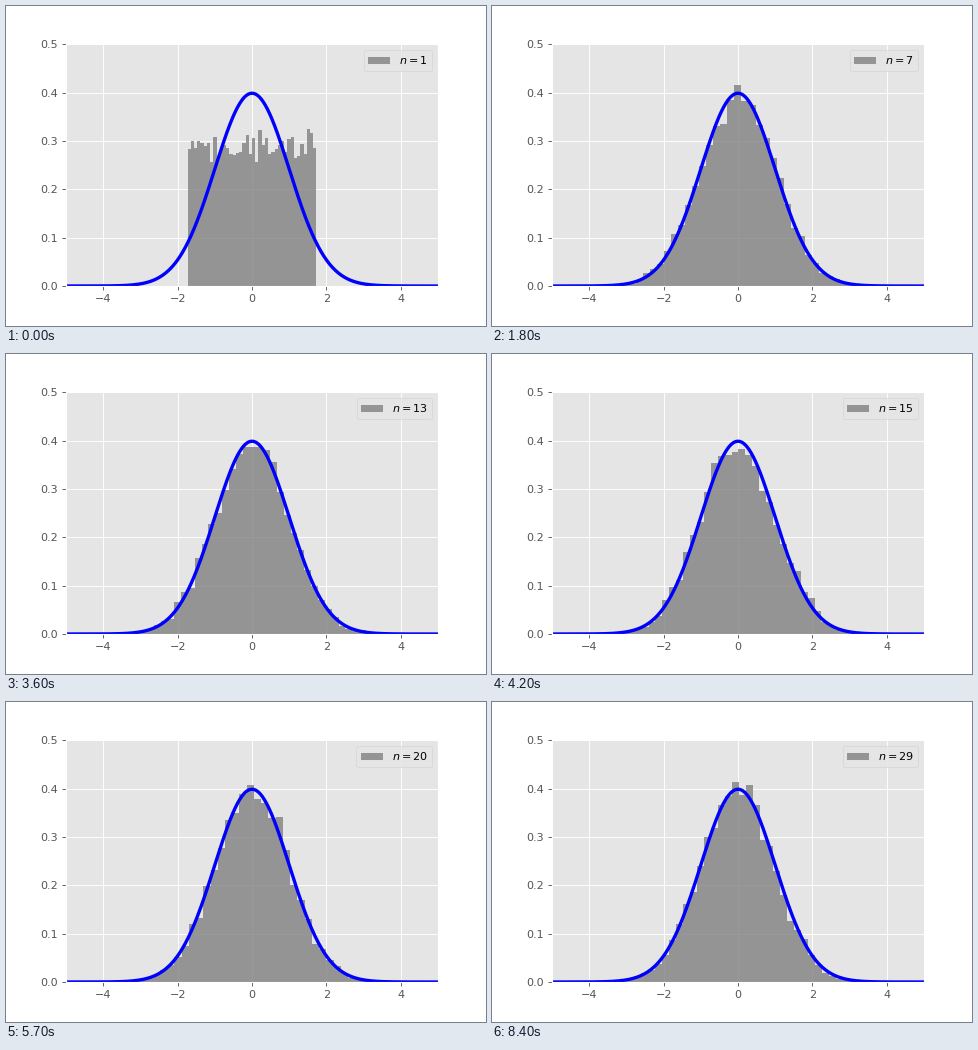
A matplotlib script for the animation above (8.7 s loop, 480 px wide and 320 px high).

```python
import numpy as np
import matplotlib.pyplot as plt
from matplotlib.animation import FuncAnimation

plt.style.use("ggplot")
plt.rcParams["font.family"] = "DejaVu Sans"

STEPS = 29
STEP_MS = 300
SAMPLES = 10000
BINS = 40


def normal_pdf(x):
    return np.exp(-x ** 2 / 2) / np.sqrt(2 * np.pi)


def standardised_sums(n):
    """Sums of n uniform variables, scaled to mean 0 and variance 1."""
    rng = np.random.default_rng(n)
    sums = rng.random((SAMPLES, n)).sum(axis=1)
    return (sums - n / 2) / np.sqrt(n / 12)


fig = plt.figure(figsize=(6, 4), dpi=80)
fig.subplots_adjust(left=0.125, right=0.9, bottom=0.125, top=0.88)
ax = fig.add_subplot()
curve_x = np.linspace(-5, 5, 500)


def draw(i):
    n = i + 1
    ax.clear()
    ax.hist(standardised_sums(n), bins=BINS, density=True,
            color="gray", alpha=0.8, label=f"$n={n}$")
    ax.plot(curve_x, normal_pdf(curve_x), color="blue", lw=3)
    ax.set_xlim(-5, 5)
    ax.set_ylim(0, 0.5)
    ax.legend(loc="upper right")
    return []


anim = FuncAnimation(fig, draw, frames=STEPS, interval=STEP_MS,
                     init_func=lambda: [], repeat=True, repeat_delay=0)
plt.show()
```
